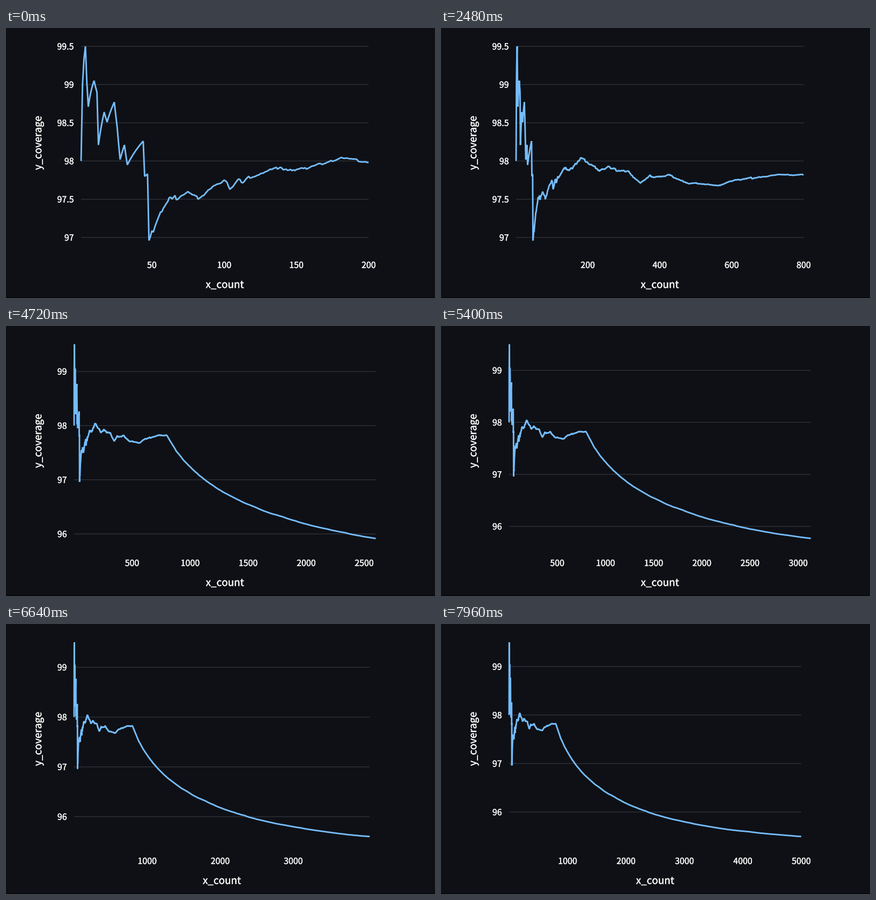
A matplotlib script that plays this animation: 800 px wide and 504 px high, repeating every 8 s.

```python
import math

import numpy as np
import matplotlib.pyplot as plt
from matplotlib.animation import FuncAnimation
from matplotlib.patches import Rectangle
from matplotlib.patheffects import withStroke

W, H, DPI = 800, 504, 64
STEP_MS, FRAMES = 40, 200
PT = 72 / DPI
BG, GRID, LINE, INK = "#0e1015", "#303237", "#75bcfc", "#fafafa"
TOP, BOTTOM, RIGHT = 34.2, 396.7, 689.5
DIGIT = 8.9
PEAK = 99.5

plt.rcParams["font.family"] = "Noto Sans CJK JP"

# Turning points of the running mean: (sample count, mean)
TURNS = [(1, 98), (4, 99.5), (6, 98.71), (10, 99.05), (12, 98.9), (13, 98.21),
         (17, 98.64), (19, 98.51), (24, 98.77), (26, 98.44), (28, 98.02),
         (31, 98.21), (33, 97.95), (44, 98.26), (45, 97.8), (47, 97.83),
         (48, 96.96), (62, 97.52), (75, 97.6), (82, 97.5), (101, 97.74),
         (104, 97.63), (117, 97.8), (142, 97.89), (182, 98.04), (200, 97.98),
         (228, 97.88), (269, 97.9), (314, 97.87), (347, 97.71), (372, 97.81),
         (435, 97.8), (478, 97.71), (563, 97.68), (669, 97.78), (800, 97.82),
         (888, 97.51), (1800, 96.315), (5000, 95.495)]

# Time in ms and samples loaded by then
LOADED = [(840, 200), (2440, 800), (2520, 800), (3960, 1800), (4720, 2600),
          (6000, 3600), (6240, 3800), (6400, 3800), (6640, 4048),
          (7200, 4500), (7280, 4500), (7920, 5000)]


def running_mean():
    """Scores are steady between turns, with random drops that cancel out."""
    at, mean = np.array(TURNS).T
    n = np.arange(1, 5001)
    rng = np.random.default_rng(4)
    spread = np.where(n <= 48, 0, np.where(n <= 800, 1.3, 0.7))
    walk = np.cumsum(spread * (1 - rng.exponential(size=n.size)))
    walk -= np.interp(n, at, walk[at.astype(int) - 1])
    return n, (np.interp(n, at, at * mean) + walk) / n


def ticks(lo, hi):
    raw = (hi - lo) / 5
    power = 10 ** math.floor(math.log10(raw))
    factor = next((f for f, lim in ((10, 50), (5, 10), (2, 2))
                   if raw / power >= math.sqrt(lim)), 1)
    step = power * factor
    return [k * step for k in range(math.ceil(lo / step),
                                    math.floor(hi / step) + 1)]


COUNT, COVER = running_mean()

fig = plt.figure(figsize=(W / DPI, H / DPI), dpi=DPI, facecolor=BG)
ax = fig.add_axes([0, 0, 1, 1])
ax.set_xlim(0, W)
ax.set_ylim(0, H)
ax.axis("off")
ax.add_patch(Rectangle((0, 0), W, 1, color="#000000", lw=0))


def label(size, text="", **kw):
    bold = [withStroke(linewidth=0.35 * PT, foreground=INK)]
    return ax.text(0, 0, text, color=INK, fontsize=size * PT, va="baseline",
                   path_effects=bold, **kw)


def stroke(color, width, **kw):
    return ax.plot([], [], color=color, lw=width * PT, snap=False,
                   solid_capstyle="butt", **kw)[0]


grid = [stroke(GRID, 1.4) for _ in range(10)]
y_labels = [label(16, ha="right") for _ in range(10)]
x_labels = [label(16, ha="center") for _ in range(10)]
x_title = label(18.9, "x_count", ha="center")
y_title = label(18.9, "y_coverage", ha="center", rotation=90,
                rotation_mode="anchor")
y_title.set_position((66, H - 214.5))
curve = stroke(LINE, 2.9, solid_joinstyle="bevel", zorder=3)


def draw(i):
    total = int(round(np.interp(i * STEP_MS, *zip(*LOADED))))
    n, v = COUNT[:total], COVER[:total]
    low = v.min()
    y_ticks, x_ticks = ticks(low, PEAK), ticks(1, total)
    left = 140 if y_ticks[1] - y_ticks[0] < 1 else 127

    # The plot shrinks so that the last tick label stays on the chart
    half = len(str(int(x_ticks[-1]))) * DIGIT / 2
    room = (RIGHT - half - left) * (total - 1) / (x_ticks[-1] - 1)
    right = min(RIGHT, left + room)

    def px(c):
        return left + (right - left) * (c - 1) / (total - 1)

    def py(p):
        return H - TOP - (BOTTOM - TOP) * (PEAK - p) / (PEAK - low)

    for artist in grid + y_labels + x_labels:
        artist.set_visible(False)
    for t, rule, text in zip(y_ticks, grid, y_labels):
        y = py(t)
        rule.set_data([left, right], [y, y])
        rule.set_visible(True)
        text.set(text=f"{t:g}", position=(left - 13.3, y - 6), visible=True)
    for t, text in zip(x_ticks, x_labels):
        x = px(t)
        fits = x + half <= right + 0.5 or x >= right - 1
        text.set(text=f"{t:g}", position=(x, H - 448), visible=fits)

    x_title.set_position(((left + right) / 2, H - 485.2))
    curve.set_data(px(n), py(v))
    return [curve]


anim = FuncAnimation(fig, draw, frames=FRAMES, interval=STEP_MS, repeat=True,
                     repeat_delay=0, blit=False)
plt.show()
```
